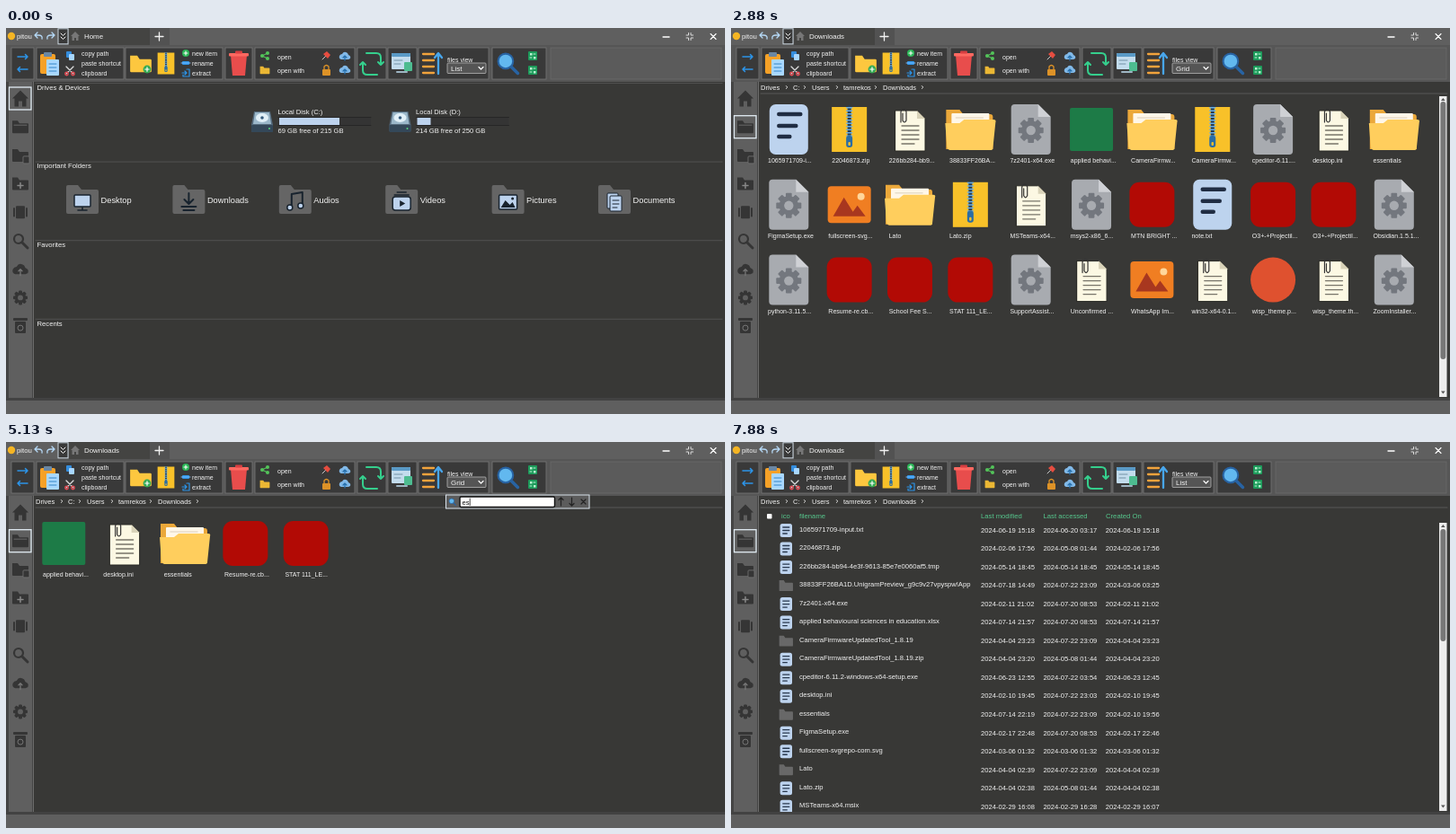
An HTML page that plays this animation: 800x430 px, repeating every 8 s.

```html
<!DOCTYPE html>
<html lang="en">
<head>
<meta charset="utf-8">
<title>File manager</title>
<style>
html, body { margin: 0; width: 100%; height: 100%; overflow: hidden; background: #383836; }
svg { display: block; width: 800px; height: 430px; }
text { font-family: "Liberation Sans", Arial, sans-serif; fill: #f4f4f4; white-space: pre; }
</style>
</head>
<body>
<svg id="stage" viewBox="0 0 800 430"></svg>
<script>
const LOOP = 8000;
const BLUE = "#2c94e8", DARK = "#393939", GREY = "#5f5f5f", PALE = "#bdd3ee";

const rect = (x, y, w, h, fill, r = 0, extra = "") =>
  `<rect x="${x}" y="${y}" width="${w}" height="${h}" rx="${r}" fill="${fill}" ${extra}/>`;
const circle = (x, y, r, fill, extra = "") => `<circle cx="${x}" cy="${y}" r="${r}" fill="${fill}" ${extra}/>`;
const fill = (d, color) => `<path d="${d}" fill="${color}"/>`;
const line = (d, color, w = 1) =>
  `<path d="${d}" fill="none" stroke="${color}" stroke-width="${w}" stroke-linecap="round" stroke-linejoin="round"/>`;
const text = (x, y, s, size = 7.6, color = "#f4f4f4", extra = "") =>
  `<text x="${x}" y="${y}" font-size="${size}" style="fill:${color}" ${extra}>${s}</text>`;
const at = (x, y, body, scale = 1) => `<g transform="translate(${x} ${y}) scale(${scale})">${body}</g>`;
const group = (id, body) => `<g id="${id}">${body}</g>`;

// Icons are drawn around their own centre.
const plus = color => circle(0, 0, 4, color) + line("M-2 0H2M0 -2V2", "#fff", 1.1);
const smallFolder = color => fill("M-9 -7H-3L-1 -4H8Q9 -4 9 -3V6Q9 7 8 7H-8Q-9 7 -9 6Z", color);
const lens = (ring, glass) => line("M4 4L11 11", ring, 3.4) + circle(-2, -2, 8, glass, `stroke="${ring}" stroke-width="2"`);
const cloud = color => fill("M-4 4Q-7 3 -6 0Q-5 -2 -3 -2Q-1 -6 3 -3Q4 -1 4 -1Q7 0 6 3L4 4Z", color);
const gearTeeth = (r, color) => [0, 45, 90, 135].map(a =>
  rect(-r * .24, -r, r * .48, r * 2, color, 1, `transform="rotate(${a})"`)).join("");
const gear = (r, color, hole) => gearTeeth(r, color) + circle(0, 0, r * .76, color) + circle(0, 0, r * .37, hole);

const fileIcons = {
  txt: rect(-21.5, -28, 43, 56, PALE, 7) +
    line("M-11 -17H13M-11 -4H8M-11 8H1", "#202d43", 4.5),
  zip: rect(-19.5, -25, 39, 50, "#f8c129") + line("M0 -25V9", "#233b56", 4) +
    `<path d="M0 -25V9" stroke="#6daee0" stroke-width="7" stroke-dasharray="1.5 2"/>` +
    rect(-3.5, 7, 7, 13, "#2a6da4", 3) + rect(-1.2, 14, 2.4, 4, "#f8c129", 1),
  doc: fill("M-16 -21H8L17 -12V24H-16Z", "#fcf8e3") + line("M-16 -21H8L17 -12V24H-16Z", "#282824", 1) +
    fill("M8 -21V-12H17Z", "#d9d3b9") +
    line("M-9 -4H10M-9 1H10M-9 6H10M-9 11H10M-9 16H5", "#77746a", 1.3) +
    line("M-10 -8V-20Q-7 -26 -4 -20V-10Q-6 -6 -8 -10V-18", "#333", 1.2),
  folder: fill("M-27 -22H-12L-8 -17H22Q25 -17 25 -14V22H-27Z", "#eba83a") +
    rect(-21, -18, 42, 20, "#fff7e8", 1) + line("M-16 -13H14", "#e7ddca", 1.5) +
    fill("M-28 -7H-12L-7 -11H26Q29 -11 28 -8L25 21Q25 23 22 23H-23Q-25 23 -26 20Z", "#ffce5d"),
  exe: fill("M-18 -28H8L22 -14V24Q22 28 18 28H-18Q-22 28 -22 24V-24Q-22 -28 -18 -28Z", "#a8abb0") +
    fill("M8 -28V-14H22Z", "#cfd1d5") + at(0, 1, gear(14, "#73777e", "#a8abb0")),
  xls: rect(-24, -24, 48, 48, "#1d7b47", 2),
  img: rect(-24, -20.5, 48, 41, "#f07e22", 4) + circle(13, -9, 4, "#ffd69a") +
    fill("M-18 13L-6 -8L4 8L9 1L18 13Z", "#a8371f"),
  pdf: rect(-25, -25, 50, 50, "#b20a05", 11),
  ppt: circle(0, 0, 25, "#df512f")
};

// kind, shown name | rest of the name
const files = `txt 1065971709-i|nput.txt
zip \u00a0\u00a022046873.zip
doc 226bb284-bb9|4-4e3f-9613-85e7e0060af5.tmp
folder 38833FF26BA|1D.UnigramPreview_g9c9v27vpyspw!App
exe 7z2401-x64.exe
xls applied behavi|oural sciences in education.xlsx
folder CameraFirmw|areUpdatedTool_1.8.19
zip CameraFirmw|areUpdatedTool_1.8.19.zip
exe cpeditor-6.11.|2-windows-x64-setup.exe
doc desktop.ini
folder essentials
exe FigmaSetup.exe
img fullscreen-svg|repo-com.svg
folder Lato
zip Lato.zip
doc MSTeams-x64|.msix
exe msys2-x86_6|4.exe
pdf MTN BRIGHT |.pdf
txt note.txt
pdf O3+-+Projectil|.pdf
pdf O3+-+Projectil|.pdf
exe Obsidian.1.5.1|.exe
exe python-3.11.5|.exe
pdf Resume-re.cb|.pdf
pdf School Fee S|.pdf
pdf STAT 111_LE|CTURES.pdf
exe SupportAssist|.exe
doc Unconfirmed |.tmp
img WhatsApp Im|.jpg
doc win32-x64-0.1|.tmp
ppt wisp_theme.p|ptx
doc wisp_theme.th|mx
exe ZoomInstaller|.exe`.split("\n").map(row => {
  const [, kind, name] = row.match(/^(\w+) (.*)$/);
  const [head, tail] = name.split("|");
  return { kind, label: tail ? head + "..." : head, full: (head + (tail || "")).trim() };
});

// modified, accessed, created; "@" is the minute of the latest visit
const dates = `06-19 15:18,06-20 03:17,06-19 15:18
02-06 17:56,05-08 01:44,02-06 17:56
05-14 18:45,05-14 18:45,05-14 18:45
07-18 14:49,@,03-06 03:25
02-11 21:02,07-20 08:53,02-11 21:02
07-14 21:57,07-20 08:53,07-14 21:57
04-04 23:23,@,04-04 23:23
04-04 23:20,05-08 01:44,04-04 23:20
06-23 12:55,07-22 03:54,06-23 12:45
02-10 19:45,07-22 23:03,02-10 19:45
07-14 22:19,@,02-10 19:56
02-17 22:48,07-20 08:53,02-17 22:46
03-06 01:32,03-06 01:32,03-06 01:32
04-04 02:39,@,04-04 02:39
04-04 02:38,05-08 01:44,04-04 02:38
02-29 16:08,02-29 16:28,02-29 16:07`.split("\n").map(row => row.split(","));

function titleBar() {
  return rect(0, 0, 800, 19, GREY) + rect(70, 0, 90, 19, "#444442") +
    circle(6, 9, 4.2, "#f5b524") + text(12, 12, "pitou", 7.8) +
    line("M40 12Q41 8 36 8H33M35 5L32 8L35 11", "#b5d8f5", 1.3) +
    line("M46 12Q45 8 50 8H53M51 5L54 8L51 11", "#b5d8f5", 1.3) +
    rect(58, .8, 11, 17, "#393939", 0, 'stroke="#c9d5df" stroke-width="1"') +
    line("M61 6L63.5 8.5L66 6M61 10L63.5 12.5L66 10", "#fff") +
    at(77, 9, fill("M-5 0L0 -5L5 0H3.5V5H1V2H-1V5H-3.5V0Z", "#777")) +
    rect(160, 0, 22, 19, "#525252") + line("M166 9.5H175M170.5 5V14", "#f2f2f2", 1.3) +
    line("M731 10H738", "#fff", 1.4) +
    line("M757 8H759.5V5.5M764.5 8H762V5.5M757 11H759.5V13.5M764.5 11H762V13.5", "#ddd") +
    line("M784 6.5L790 12.5M790 6.5L784 12.5", "#fff", 1.1);
}

function toolbar() {
  const boxes = [[6, 25], [34, 97], [133, 108], [244, 30], [277, 111], [391, 32], [425, 32], [459, 78], [541, 60]];
  const labels = [[84, 31, "copy path"], [84, 42, "paste shortcut"], [84, 53, "clipboard"],
    [207, 31, "new item"], [207, 42, "rename"], [207, 53, "extract"],
    [302, 35, "open"], [302, 49.5, "open with"], [491, 38, "files view"]];
  return rect(0, 19, 800, 41, "#565656") +
    boxes.map(([x, w]) => rect(x, 22, w, 35, DARK, 0, 'stroke="#777" stroke-width=".8"')).join("") +
    rect(606, 22, 190, 35, "#5b5b5b", 0, 'stroke="#696969" stroke-width=".8"') +
    labels.map(l => text(...l, 7)).join("") +
    line("M13 32H24M21.5 29.5L24 32L21.5 34.5M13 46H24M15.5 43.5L13 46L15.5 48.5", BLUE, 1.5) +
    rect(38, 29, 17, 22, "#f5a127", 2) + rect(42, 27, 9, 5, "#6a87a3", 1) +
    rect(45, 35, 14, 18, "#a9d8ff", 1) + line("M48 40H56M48 44H56M48 48H56", "#3586c5") +
    rect(67, 26, 6, 7, "#348ddd", 1) + rect(70, 29, 6, 7, "#a7d6ff", 1) +
    line("M67 43L75 51M75 43L67 51", "#ddd", 1.3) + circle(67.5, 51, 1.7, "none", 'stroke="#e54b54" stroke-width="1.4"') +
    circle(74.5, 51, 1.7, "none", 'stroke="#e54b54" stroke-width="1.4"') +
    at(150, 40, smallFolder("#fdc73f"), 1.32) + at(157, 46, plus("#34aa54"), 1.1) +
    at(178, 39.5, fileIcons.zip, .48) + at(200, 28, plus("#2bb757")) +
    rect(196, 37, 8, 4, BLUE, 1) + line("M195 39H205", "#77baff") +
    line("M201 46H204V54H197V52M196 50H201M199 48L201 50L199 52", BLUE, 1.2) +
    fill("M250 30H268L266 53H252Z", "#e84d4c") + rect(248, 28, 22, 3.5, "#ff6961", 1) + rect(255, 25.5, 8, 3, "#d73e41", 1) +
    line("M285 31L291 28M285 31L291 34", "#53c45a", 1.1) + circle(285, 31, 2, "#53c45a") +
    circle(291, 28, 2, "#53c45a") + circle(291, 34, 2, "#53c45a") + at(288, 47, smallFolder("#ebb734"), .6) +
    line("M352 35L356 31", "#ccc") + fill("M357 26L361 30L358 34L353 29Z", "#e64d40") +
    rect(352, 46, 9, 7, "#dd9227", 1) + line("M354 46V43Q356.5 40 359 43V46", "#dd9227", 1.3) +
    [31, 46].map(y => at(377, y, cloud("#81b9e8")) + line(`M377 ${y + 5}V${y}M375 ${y + 2}L377 ${y}L379 ${y + 2}`, "#256fac", 1.3)).join("") +
    line("M401 28H412Q417 28 417 33V41M414 38L417 41L420 38M413 52H402Q397 52 397 47V38M394 41L397 38L400 41", "#35cf8d", 2) +
    rect(429, 28, 21, 18, "#c3dced", 1) + rect(429, 28, 21, 4, "#5a9ac6", 1) +
    line("M432 36H441M432 40H439", "#7391a5") + rect(443, 38, 9, 10, "#4dbc90", 1) + line("M435 49H446", "#9eb5c3", 2) +
    line("M464 29H476M464 36H476M464 43H476M464 50H476", "#f2a33c", 2.3) +
    line("M481 51V29M477 33L481 28L485 33", "#48a6ec", 2.3) +
    rect(491, 39, 43, 11.5, "#555", 1, 'stroke="#b5b5b5" stroke-width=".8"') + line("M526 43.5L528.5 46L531 43.5", "#fff", 1.2) +
    `<text id="mode" x="495" y="47.8" font-size="8"></text>` +
    at(558, 39, lens("#2863a3", "#62b8ef"), 1.04) +
    [31, 47].map(y => rect(581, y - 5, 10, 10, "#1d9b5b", 1) +
      rect(583, y - 3, 2.5, 2.5, "#b9f2d2") + rect(587, y + 1, 2.5, 2.5, "#b9f2d2") + line(`M583 ${y + 2}H585M587 ${y - 2}H589`, "#b9f2d2")).join("");
}

function sidebar() {
  const c = "#353535";
  const icons = [
    fill("M-9 0L0 -9L9 0H6.5V9H2V3H-2V9H-6.5V0Z", c),
    smallFolder(c) + line("M-7 -2H7", "#696969"),
    smallFolder(c) + rect(3, 1, 7, 8, c, 1, 'stroke="#777" stroke-width=".8"'),
    smallFolder(c) + line("M0 -1V5M-3 2H3", "#888", 1.5),
    rect(-5, -7, 10, 14, c, 1) + rect(-8, -5, 2, 10, c) + rect(6, -5, 2, 10, c),
    circle(-2, -2, 5, "none", `stroke="${c}" stroke-width="2.2"`) + line("M2 2L8 8", c, 3),
    at(0, 0, cloud(c), 1.4) + line("M0 7V0M-2 2L0 0L2 2", "#777", 1.3),
    gear(8, c, GREY),
    rect(-6, -5, 12, 13, c, 1) + rect(-8, -9, 16, 3, c, 1) + circle(0, 2, 3, "none", 'stroke="#777"')
  ];
  return rect(0, 60, 31, 355, "#444") + rect(3, 60, 26, 352, GREY) +
    icons.map((icon, i) => at(16, 78.5 + i * 31.7, icon)).join("") +
    rect(3.5, 66, 24.5, 25, "none", 0, 'id="picked" stroke="#e2edf4" stroke-width="1.3"') +
    line("M30.5 60V412", "#777", .8);
}

function home() {
  const heads = ["Drives &amp; Devices", "Important Folders", "Favorites", "Recents"];
  const drive = (x, name, room, used) => at(x + 12, 104, fill("M-9 -11H9L12 4V10Q12 12 10 12H-10Q-12 12 -12 10V4Z", "#556b7d") +
      fill("M-8 -10H8L10 3H-10Z", "#9bb8ca") + `<ellipse cy="-4" rx="7" ry="5" fill="#e1f0f8"/>` +
      circle(0, -4, 1.8, "#355b7d") + rect(-12, 4, 24, 8, "#344859", 1) + circle(8, 8, 1, "#57d77e")) +
    text(x + 29.5, 96, name) + rect(x + 30, 99.5, 103, 9, "#343434") +
    line(`M${x + 30} 99.5H${x + 133}M${x + 30} 108.5H${x + 133}`, "#222", .8) + rect(x + 31, 100, used, 8, PALE) +
    text(x + 29.5, 117, room);
  const ink = "#18232e";
  const marks = {
    Desktop: rect(-9, -5, 18, 13, PALE, 1, `stroke="${ink}" stroke-width="1.5"`) + line("M0 9V12M-5 12H5", ink, 1.6),
    Downloads: line("M0 -7V4M-5 0L0 5L5 0M-8 8H8M-6 12H6", ink, 2),
    Audios: line("M-4 8V-6L8 -8V6", ink, 2) + circle(-6, 9, 3, PALE, `stroke="${ink}" stroke-width="1.5"`) + circle(6, 7, 3, PALE, `stroke="${ink}" stroke-width="1.5"`),
    Videos: rect(-10, -3, 20, 15, PALE, 3, `stroke="${ink}" stroke-width="1.5"`) + line("M-8 -5H8M-5 -8H5", ink, 1.5) + fill("M-2 1L4 4.5L-2 8Z", ink),
    Pictures: rect(-10, -5, 20, 16, PALE, 1, `stroke="${ink}" stroke-width="1.5"`) + fill("M-8 9L-3 1L2 6L5 3L8 9Z", ink) + circle(5, -1, 1.5, ink),
    Documents: rect(-8, -7, 12, 17, PALE, 1, `stroke="${ink}"`) + rect(-5, -4, 13, 17, PALE, 1, `stroke="${ink}"`) + line("M-2 1H5M-2 5H5M-2 9H3", ink)
  };
  return heads.map((s, i) => line(`M33 ${61.5 + i * 87.6}H797`, "#575757", .8) + text(34.5, 68.5 + i * 87.8, s, 7.7)).join("") +
    drive(273, "Local Disk (C:)", "69 GB free of 215 GB", 67) +
    drive(426.5, "Local Disk (D:)", "214 GB free of 250 GB", 15) +
    Object.entries(marks).map(([name, mark], i) => {
      const x = 67 + i * 118.4;
      return at(x + 18, 191, fill("M-18 -14Q-18 -16 -16 -16H-5L-1 -11H16Q18 -11 18 -9V14Q18 16 16 16H-16Q-18 16 -18 14Z", "#656565") + mark) +
        text(x + 38.5, 195, name, 9.3);
    }).join("");
}

function crumbs() {
  const parts = [[33, "Drives"], [69, "C:"], [90, "Users"], [125, "tamrekos"], [169, "Downloads"]];
  return parts.map(([x, s]) => text(x, 68.5, s, 7.5)).join("") +
    [62, 82, 118, 161, 213].map(x => line(`M${x - .7} 64.5L${x + .8} 66L${x - .7} 67.5`, "#eee", .9)).join("") +
    line("M33 73H797", "#606060", .8);
}

function scrollbar(top, thumbTop, thumbEnd) {
  return rect(788, top, 8.5, 411 - top, "#ededed") + rect(789.3, thumbTop, 6, thumbEnd - thumbTop, "#777", 3) +
    fill(`M790 ${top + 5}L792.3 ${top + 2}L794.6 ${top + 5}Z`, "#555") + fill("M790 404.5L792.3 407.5L794.6 404.5Z", "#555");
}

function list() {
  const heads = [[56, "ico"], [76, "filename"], [278, "Last modified"], [347.5, "Last accessed"], [417, "Created On"]];
  const page = rect(-6.7, -7.5, 13.4, 15, PALE, 2.5) + line("M-3.5 -3.5H3.5M-3.5 0H3.5M-3.5 3.5H1", "#28384e", 1.3);
  return rect(40, 80, 5.5, 5.5, "#fff", 1) + heads.map(([x, s]) => text(x, 85, s, 7.7, "#56c78d")).join("") +
    dates.map((row, i) => {
      const y = i * 20.52;
      return at(61.3, 98.5 + y, files[i].kind == "folder" ? at(0, 0, smallFolder("#686868"), .85) : page) +
        text(76, 99.5 + y, files[i].full) +
        row.map((d, k) => text(278 + k * 69.4, 100.8 + y, d == "@" ? "" : "2024-" + d, 7.6, "#f4f4f4", d == "@" ? 'class="visit"' : "")).join("");
    }).join("") + scrollbar(90, 97, 222);
}

const grid = () => files.map(f =>
  `<g class="cell">${at(23.3, 0, fileIcons[f.kind])}${text(0, 37, f.label, 7)}</g>`).join("") + scrollbar(76, 82, 369);

const searchBar = () => rect(489.5, 59, 159.5, 15, "#5c5c5c", 0, 'stroke="#dbe5ee" stroke-width="1"') +
  at(496.5, 66.5, lens("#2863a3", "#62b8ef"), .35) +
  rect(505, 61, 105.5, 11.5, "#fff", 1.5, 'stroke="#111" stroke-width="1.4"') +
  `<text id="query" x="507.5" y="69.5" font-size="7.6" style="fill:#111"></text>` +
  group("caret", line("M0 63V70.5", "#111", .8)) +
  line("M617.5 71V62M615 64.5L617.5 62L620 64.5M629.5 62V71M627 68.5L629.5 71L632 68.5M640 64L645 69M645 64L640 69", "#222", 1.2);

document.getElementById("stage").innerHTML = rect(0, 0, 800, 430, "#383836") +
  group("home", home()) + group("folder", crumbs() + group("list", list()) + group("grid", grid())) +
  titleBar() + text(87, 12, "", 7.9, "#f4f4f4", 'id="tab"') + toolbar() + sidebar() +
  rect(0, 412, 800, 3, "#424242") + rect(0, 415, 800, 15, GREY) + group("search", searchBar());

const el = id => document.getElementById(id);
const show = (node, on) => { node.style.display = on ? "" : "none"; };
const cells = [...document.querySelectorAll(".cell")], visits = [...document.querySelectorAll(".visit")];

const scenes = [
  { from: 0, view: "home" },
  { from: 1380, view: "list", visit: "23:01" },
  { from: 2630, view: "grid" },
  { from: 3380, view: "grid", query: "" },
  { from: 3750, view: "grid", query: "e" },
  { from: 4000, view: "grid", query: "es" },
  { from: 5380, view: "grid", query: "" },
  { from: 5750, view: "grid" },
  { from: 7380, view: "list", visit: "23:09" }
];
let current;

function enter({ view, query, visit }) {
  const atHome = view == "home", searching = query !== undefined;
  show(el("home"), atHome);
  show(el("folder"), !atHome);
  show(el("list"), view == "list");
  show(el("grid"), view == "grid");
  show(el("search"), searching);
  show(el("grid").lastElementChild.parentNode, view == "grid");
  el("tab").textContent = atHome ? "Home" : "Downloads";
  el("mode").textContent = view == "grid" ? "Grid" : "List";
  el("picked").setAttribute("y", atHome ? 66 : 97.7);
  el("query").textContent = query || "";
  el("caret").setAttribute("transform", `translate(${508.2 + (query || "").length * 4} 0)`);
  visits.forEach(v => { v.textContent = "2024-07-22 " + visit; });
  let n = 0;
  cells.forEach((cell, i) => {
    const match = files[i].full.toLowerCase().includes(query || "");
    show(cell, match);
    if (!match) return;
    cell.setAttribute("transform", `translate(${41 + n % 11 * 67.35} ${113 + Math.floor(n / 11) * 83.8})`);
    n++;
  });
  // A short result fits, so the scrollbar goes.
  [...el("grid").children].slice(cells.length).forEach(part => show(part, n > 11));
}

function frame(now) {
  const t = now % LOOP;
  const scene = scenes.filter(s => s.from <= t).pop();
  if (scene !== current) enter(current = scene);
  requestAnimationFrame(frame);
}
enter(current = scenes[0]);
requestAnimationFrame(frame);
</script>
</body>
</html>
```
